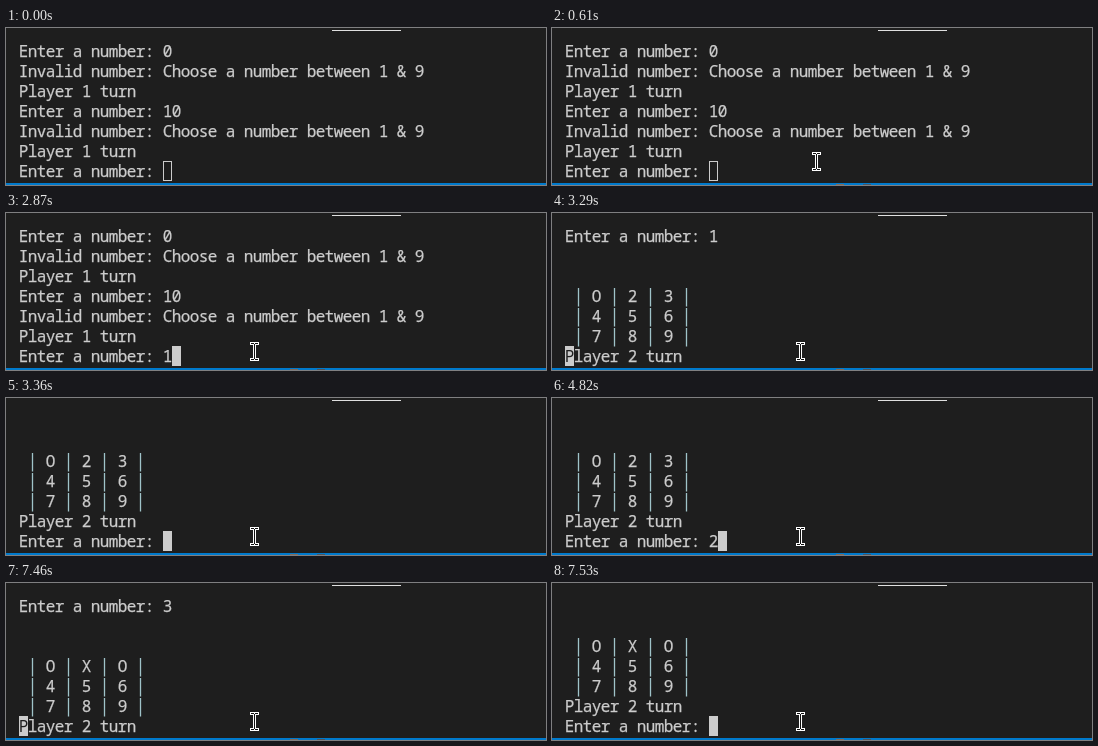
An HTML page for the animation above (8000 ms loop, 540 by 157 pixels).

```html
<!DOCTYPE html>
<html lang="en">
<head>
<meta charset="utf-8">
<title>Terminal game</title>
<style>
html, body { margin: 0; width: 100%; height: 100%; overflow: hidden; background: #1e1e1e; }
svg { display: block; width: 540px; height: 157px; }
text {
  font: 16px "Noto Sans Mono", "DejaVu Sans Mono", monospace;
  letter-spacing: -0.6px; white-space: pre;
  fill: #cccccc; stroke: #cccccc; stroke-width: 0.25px;
}
#under { fill: #1e1e1e; stroke: none; }
</style>
</head>
<body>
<svg viewBox="0 0 540 157">
  <rect width="540" height="157" fill="#1e1e1e"/>
  <rect x="326" y="2" width="69" height="1" fill="#e0e0e0"/>
  <g id="lines"></g>
  <path id="bars" stroke="#9fc3c9" stroke-width="1.3"/>
  <rect id="caret" width="9" height="20"/>
  <text id="under"></text>
  <rect y="155" width="540" height="2" fill="#007acc"/>
  <g id="tint">
    <rect x="284" y="156" width="8" height="1" fill="#7d6a5c"/>
    <rect x="311" y="156" width="8" height="1" fill="#4a5560"/>
  </g>
  <g id="mouse" fill="none" stroke-linecap="square">
    <path d="M-3 -8H3M0 -8V8M-3 8H3" stroke="#ffffff" stroke-width="3"/>
    <path d="M-3 -8H-1M1 -8H3M0 -7V7M-3 8H-1M1 8H3" stroke="#111111" stroke-width="1"/>
  </g>
</svg>
<script>
const LOOP = 8000, LEFT = 13, TOP = 13, COL = 9, ROW = 20, BASE = 16;
const PROMPT = 'Enter a number: ';
const $ = id => document.getElementById(id);

function set(el, attrs) {
  for (const k in attrs) el.setAttribute(k, attrs[k]);
}

const rows = Array.from({ length: 7 }, (_, i) => {
  const el = document.createElementNS('http://www.w3.org/2000/svg', 'text');
  set(el, { x: LEFT - 0.3, y: TOP + i * ROW + BASE });
  return $('lines').appendChild(el);
});

const board = top => [` | ${[...top].join(' | ')} |`, ' | 4 | 5 | 6 |', ' | 7 | 8 | 9 |'];
const turn = n => `Player ${n} turn`;
const retry = ['Invalid number: Choose a number between 1 & 9', turn(1)];
const errors = typed => [PROMPT + '0', ...retry, PROMPT + '10', ...retry, PROMPT + typed];
const printed = (typed, top, n) => [PROMPT + typed, '', '', ...board(top), turn(n)];
const waiting = (top, n, typed) => ['', '', ...board(top), turn(n), PROMPT + typed];

// [start time, lines, caret column (default: end of last line)]
const scenes = [
  [0, errors('')],
  [2870, errors('1')],
  [3290, printed('1', 'O23', 2), 0],
  [3360, waiting('O23', 2, '')],
  [4820, waiting('O23', 2, '2')],
  [5420, waiting('OX3', 1, '')],
  [6860, waiting('OX3', 1, '3')],
  [7460, printed('3', 'OXO', 2), 0],
  [7530, waiting('OXO', 2, '')]
];

function drawText(lines, col) {
  let bars = '';
  lines.forEach((line, i) => {
    rows[i].textContent = line.replace(/\|/g, ' ');
    [...line].forEach((ch, c) => {
      if (ch === '|') bars += `M${LEFT + c * COL + 4.5} ${TOP + i * ROW + 2}v18.5`;
    });
  });
  set($('bars'), { d: bars });
  set($('under'), { x: LEFT + col * COL - 0.3, y: TOP + 6 * ROW + BASE });
  $('under').textContent = lines[6][col] || '';
}

function drawCaret(col, focused) {
  const inset = focused ? 0 : 0.5;
  set($('caret'), {
    x: LEFT + col * COL + inset, y: TOP + 6 * ROW + inset,
    width: COL - 2 * inset, height: ROW - 2 * inset,
    fill: focused ? '#cccccc' : 'none',
    stroke: focused ? 'none' : '#cccccc'
  });
}

function drawMouse(t) {
  const visibility = t >= 260 ? 'visible' : 'hidden';
  // The pointer glides in on a curve, sampled like a screen recording.
  const step = Math.floor((t - 260) / 77.5);
  const p = Math.max(0, Math.min(1, step / 7));
  const e = 1 - (1 - p) ** 2, q = 1 - e;
  const x = q * q * 351 + 2 * q * e * 290 + e * e * 248;
  const y = q * q * 150 + 2 * q * e * 120 + e * e * 138;
  set($('tint'), { visibility });
  set($('mouse'), {
    visibility,
    transform: `translate(${Math.round(x) + 0.5} ${Math.round(y) + 0.5})`
  });
}

let current;
function draw(t) {
  const scene = scenes.filter(s => s[0] <= t).pop();
  const [, lines, col = lines[6].length] = scene;
  if (scene !== current) drawText(lines, col);
  current = scene;
  drawCaret(col, t >= 880);
  drawMouse(t);
}

const start = performance.now();
function tick() {
  draw((performance.now() - start) % LOOP);
  requestAnimationFrame(tick);
}
tick();
</script>
</body>
</html>
```
